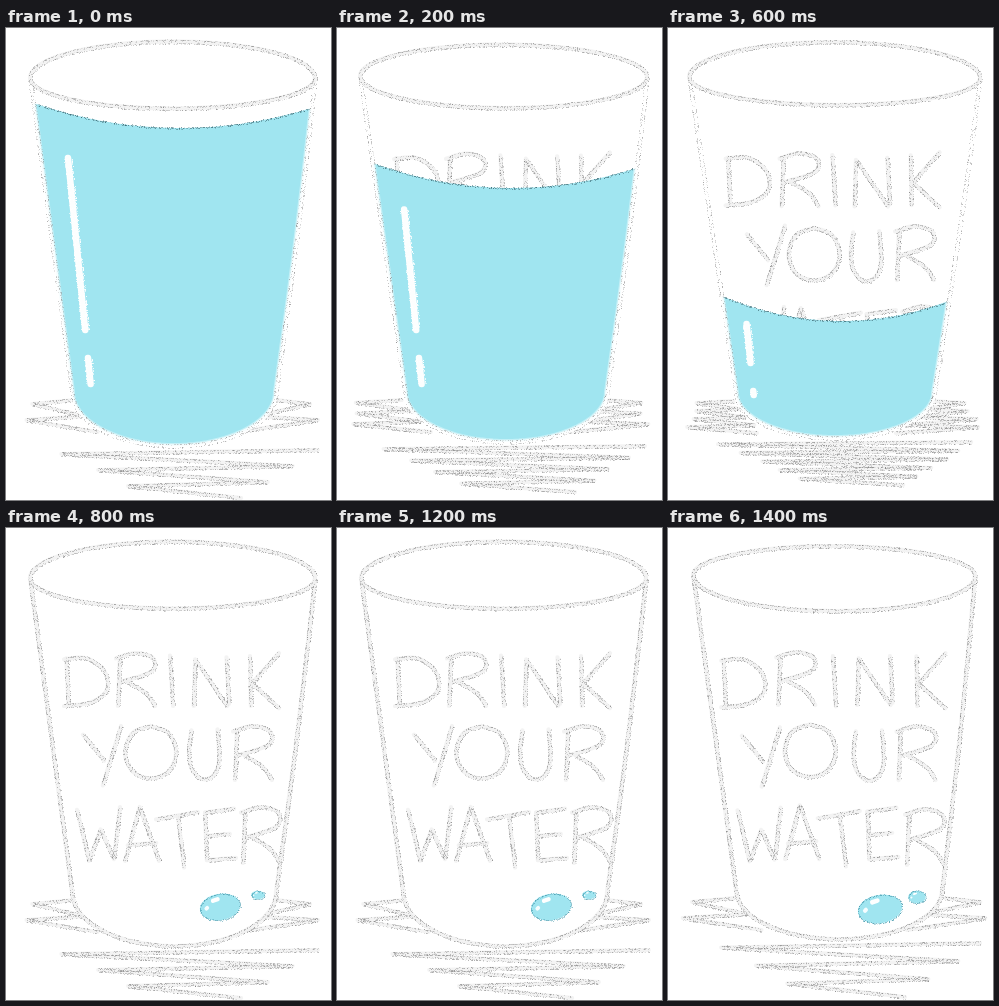
Write an HTML page with a canvas that moves like this. It is 325 px wide and 472 px high and loops after 1600 ms.

```html
<!DOCTYPE html>
<html lang="en">
<head>
<meta charset="utf-8">
<title>Drink your water</title>
<style>
  html, body { margin: 0; width: 100%; height: 100%; overflow: hidden; background: #fff; }
  canvas { display: block; }
</style>
</head>
<body>
<canvas id="stage" width="325" height="472" role="img" aria-label="Drink your water"></canvas>
<script>
const ctx = document.getElementById('stage').getContext('2d');
const STEP = 200;
const BLUE = '#a0e5f0';
const { PI, sin, cos, max, floor, hypot, round } = Math;
let seed = 1;

function rand() {
  seed = (seed * 1664525 + 1013904223) >>> 0;
  return seed / 4294967296;
}
const spread = n => (rand() * 2 - 1) * n;
const lerp = (a, b, t) => a + (b - a) * t;
const sample = (n, fn) => Array.from({ length: n + 1 }, (_, i) => fn(i / n, i));

// Strokes in a unit box, separated by "|"; "~" marks a smooth curve.
const GLYPHS = {
  D: [45, '.05,.1 .1,.97|~0,.12 .5,.1 .9,.35 .95,.7 .6,.93 0,1'],
  R: [39, '.1,.1 .05,1|~0,.1 .5,0 .95,.1 .9,.35 .1,.55|~.3,.55 .75,.75 1,1'],
  I: [3, '0,.05 1,1'],
  N: [36, '.02,1 .06,.12 .95,1|.93,.08 1,.96'],
  K: [29, '0,.06 .03,1|1,0 .07,.57 1,1.04'],
  Y: [38, '0,.16 .56,.64|1,0 .52,1.1'],
  O: [51, '~.5,0 .15,.13 0,.5 .15,.84 .5,.97 .85,.84 1,.5 .85,.13 .5,0'],
  U: [30, '~.08,.08 0,.45 .08,.78 .42,.98 .8,.92 1,.65 .95,.06'],
  W: [43, '0,.05 .28,.96 .55,.4 .86,.93 1,0'],
  A: [34, '0,.96 .43,0 1,.96|.08,.68 .92,.64'],
  T: [42, '0,.22 1,.09|.52,.16 .67,1.08'],
  E: [31, '0,.1 .06,.95|0,.1 .94,.03|.03,.52 .8,.48|.06,.95 1,.91']
};
const ROWS = [
  { text: 'DRINK', y: 125, h: 53, x: [58, 110, 164, 187, 244] },
  { text: 'YOUR', y: 198, h: 54, x: [77, 119, 183, 227] },
  { text: 'WATER', y: 279, h: 56, x: [71, 119, 150, 199, 235] }
];

// Rim ends, the two ends of the round base, and the ground scribble.
const POSES = {
  a: { left: [24, 50], right: [309, 50], top: 13.5, lip: 80.5, base: [66, 270], bend: 364, bottom: 418,
       reach: [15, 319], turns: 4, ground: 470, wide: 1, wobble: 0,
       drops: [[214, 379, 20, 13], [252, 367, 6.5, 4]] },
  b: { left: [23, 48], right: [310, 49], top: 16.5, lip: 80, base: [68, 270], bend: 364, bottom: 414,
       reach: [11, 317], turns: 6, ground: 464, wide: 1.01, wobble: 1 },
  c: { left: [22, 47], right: [312, 46], top: 16.5, lip: 77.5, base: [67, 266], bend: 366, bottom: 411,
       reach: [14, 316], turns: 6, ground: 461, wide: 1.02, wobble: 1 },
  d: { left: [21, 49], right: [312, 50], top: 14, lip: 77, base: [68, 266], bend: 365, bottom: 410,
       reach: [17, 315], turns: 8, ground: 457, wide: 1, wobble: 2 },
  e: { left: [25, 47], right: [307, 48], top: 18, lip: 83, base: [68, 274], bend: 362, bottom: 411,
       reach: [12, 324], turns: 4, ground: 469, wide: 1.03, wobble: 2,
       drops: [[212, 381, 22, 14], [249, 369, 8.5, 6]] }
};
const STATES = [
  { pose: 'a', level: 100 }, { pose: 'b', level: 160 },
  { pose: 'c', level: 218 }, { pose: 'd', level: 293 },
  { pose: 'a' }, { pose: 'e' }, { pose: 'a' }, { pose: 'e' }
];

function smooth(p) {
  const at = i => p[max(0, i < p.length ? i : p.length - 1)];
  return sample((p.length - 1) * 8, (_, k) => {
    const i = floor(k / 8), t = k / 8 - i;
    return [0, 1].map(c => {
      const [w, x, y, z] = [-1, 0, 1, 2].map(d => at(i + d)[c]);
      return x + t * ((y - w) + t * (2 * w - 5 * x + 4 * y - z) + t * t * (3 * x - w - 3 * y + z)) / 2;
    });
  });
}

function trace(p) {
  ctx.beginPath();
  p.forEach(([x, y]) => ctx.lineTo(x, y));
}

function fill(p, color) {
  trace(p);
  ctx.fillStyle = color;
  ctx.fill();
}

function line(p, width, color) {
  trace(p);
  ctx.lineWidth = width;
  ctx.strokeStyle = color;
  ctx.lineCap = ctx.lineJoin = 'round';
  ctx.stroke();
}

// Scatters grain along a path; place() picks the distance from its centre.
function grain(p, density, place, color) {
  for (let i = 1; i < p.length; i++) {
    const [x, y] = p[i - 1], dx = p[i][0] - x, dy = p[i][1] - y;
    const len = hypot(dx, dy) || 1;
    for (let k = floor(len * density + rand()); k > 0; k--) {
      const t = rand(), o = place();
      ctx.fillStyle = color();
      ctx.fillRect(round(x + dx * t - dy / len * o), round(y + dy * t + dx / len * o), 1, 1);
    }
  }
}

const tint = (rgb, low, high) => () => `rgba(${rgb},${lerp(low, high, rand())})`;
const grey = tint('125,125,125', 0.08, 0.46);
const edge = w => () => (rand() < 0.5 ? -1 : 1) * w * (1 - rand() * rand());

function pencil(p, w = 2.1) {
  line(p, w * 2, 'rgba(242,242,242,.9)');
  grain(p, 2.4, edge(w), grey);
}

function letters(pose) {
  for (const { text, x, y, h } of ROWS) {
    [...text].forEach((ch, i) => {
      const [w, shape] = GLYPHS[ch];
      const left = 160 + (x[i] - 160) * pose.wide + spread(pose.wobble);
      const top = y + spread(pose.wobble);
      for (const s of shape.split('|')) {
        const p = s.replace('~', '').split(' ').map(q => {
          const [u, v] = q.split(',');
          return [left + u * w, top + v * h];
        });
        pencil(s[0] === '~' ? smooth(p) : p);
      }
    });
  }
}

// Half an ellipse from a to b, its middle pulled to height y.
function arc(a, b, y) {
  const h = y - (a[1] + b[1]) / 2;
  return sample(48, t => {
    const u = (1 - cos(t * PI)) / 2;
    return [lerp(a[0], b[0], u), lerp(a[1], b[1], u) + h * sin(t * PI)];
  });
}

const wallX = (pose, side, y) => {
  const [top, foot] = side ? [pose.right, pose.base[1]] : [pose.left, pose.base[0]];
  const t = (y - top[1]) / (pose.bend - top[1]);
  return lerp(top[0], foot, t) + side * 1.5 * sin(t * PI);
};

// The glass wall below the given heights: down the left, round the base, up the right.
function wall(pose, yl, yr) {
  const { bend, base, bottom } = pose;
  const side = (s, y) => sample(24, t => [wallX(pose, s, lerp(y, bend, t)), lerp(y, bend, t)]);
  return [...side(0, yl), ...arc([base[0], bend], [base[1], bend], bottom), ...side(1, yr).reverse()];
}

// Back and forth between two drifting x positions, each return almost level.
const zigzag = (n, y0, y1, from, to) => sample(n, (t, i) => {
  const x = i % 2 ? to : from;
  return [lerp(x[0], x[1], t) + spread(3), lerp(y0, y1, t) - (i % 2 ? 0.5 : 0) * (y1 - y0) / n];
});

function scribble({ base, bend, bottom, reach: [l, r], turns, ground }) {
  const y0 = bend + 8, y1 = bend + 40;
  const parts = [
    zigzag(turns, y0, y1, [base[0], base[0] + 24], [l + 12, l + 3]),
    zigzag(turns, y0, y1, [base[1], base[1] - 38], [r - 18, r - 3]),
    zigzag(turns + 2, bottom + 4, ground, [r - 10, 238], [l + 24, l + 125])
  ];
  parts.forEach(p => pencil(p, 1.9));
}

function shine(level) {
  const start = 130 + (level - 100) * 0.86;
  const end = max(302, start + 39);
  const at = y => [62 + (y - 130) * 0.1, y];
  for (const p of [[at(start), at(end)], [at(end + 28), at(356 + (end - 302) / 3)]]) {
    line(p, 6.5, '#fcfefe');
    grain(p, 2.5, edge(4), tint('255,255,255', 0.5, 0.9));
  }
}

function water(pose, level) {
  const yl = level - 25, yr = level - 20;
  const xl = wallX(pose, 0, yl), xr = wallX(pose, 1, yr);
  const surface = sample(40, t => [lerp(xl, xr, t), lerp(yl, yr, t) + 90 * t * (1 - t)]);
  const rim = wall(pose, yl, yr);
  fill([...rim, ...[...surface].reverse()], BLUE);
  grain(surface, 1.5, () => spread(0.9), tint('60,105,115', 0.15, 0.65));
  shine(level);
  line(rim, 6, 'rgba(255,255,255,.4)');
  line(rim, 3.5, 'rgba(255,255,255,.85)');
  grain(wall(pose, pose.left[1], pose.right[1]), 1.5, edge(2.1), grey);
}

function drop([x, y, rx, ry]) {
  const p = sample(48, t => {
    const c = cos(t * 2 * PI), s = sin(t * 2 * PI);
    return [x + c * rx + s * 2, y + s * ry - c * ry * 0.25];
  });
  fill(p, BLUE);
  grain(p, 1.5, () => spread(0.7), tint('65,150,170', 0.15, 0.6));
  const spot = (u, v) => [x + u * rx, y + v * ry];
  line([spot(-0.35, -0.48), spot(-0.12, -0.6)], ry * 0.33, '#fff');
  line([spot(-0.68, 0.12), spot(-0.64, 0.06)], ry * 0.3, '#f6fdff');
}

function draw({ pose: name, level }) {
  const pose = POSES[name];
  const { left, right, top, lip } = pose;
  const body = wall(pose, left[1], right[1]);
  seed = name.charCodeAt(0) * 7919;
  fill([[0, 0], [325, 0], [325, 472], [0, 472]], '#fff');
  scribble(pose);
  fill(body, '#fff');
  letters(pose);
  if (level) {
    water(pose, level);
  } else {
    pose.drops.forEach(drop);
    pencil(body);
  }
  pencil(arc(left, right, top));
  pencil(arc(left, right, lip));
}

let shown = -1;
const start = performance.now();
function tick() {
  const i = floor(max(0, performance.now() - start) / STEP) % STATES.length;
  if (i !== shown) draw(STATES[shown = i]);
  requestAnimationFrame(tick);
}
tick();
</script>
</body>
</html>
```
